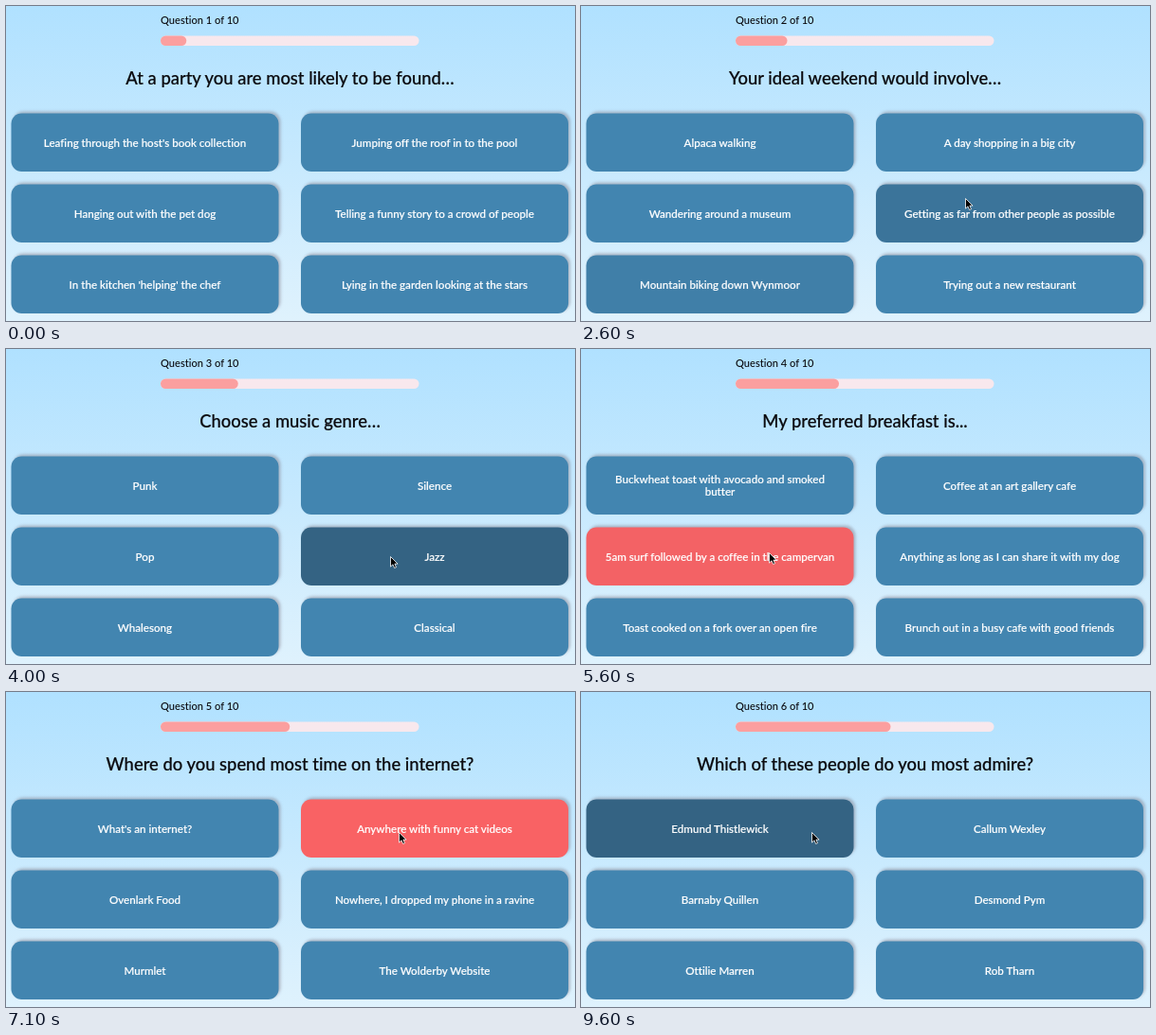
Recreate the animation shown at these times as an HTML page. Size 600 by 333 pixels, loop 9800 ms.

```html
<!DOCTYPE html>
<html lang="en">
<head>
<meta charset="utf-8">
<title>Quiz</title>
<style>
  html, body { margin: 0; width: 100%; height: 100%; overflow: hidden; background: #c5e9fe; }
  svg { display: block; width: 100vw; height: 100vh; }
  text { font: 500 11.1px Lato, "Open Sans", sans-serif; font-variant-ligatures: none; fill: #0b0b0f; }
  #title { font-size: 18.4px; text-anchor: middle; stroke: #0b0b0f; stroke-width: .2px; }
  .option text { font-size: 11.6px; fill: #fff; text-anchor: middle; stroke: #fff; stroke-width: .2px; }
  .option rect { filter: drop-shadow(2.5px -1.5px 1.5px rgba(135, 135, 150, .55)); }
</style>
</head>
<body>
<svg id="stage" viewBox="0 0 600 333">
  <defs>
    <linearGradient id="sky" x2="0" y2="1">
      <stop stop-color="#b0e1ff"/>
      <stop offset="1" stop-color="#dff2fd"/>
    </linearGradient>
  </defs>
  <rect width="600" height="333" fill="url(#sky)"/>
  <text id="count" x="163" y="19"></text>
  <rect x="163" y="31.5" width="272.5" height="10.5" rx="5.25" fill="#f8e8ed"/>
  <rect id="bar" x="163" y="31.5" height="10.5" rx="5.25" fill="#fb9f9f"/>
  <text id="title" x="299.5" y="82.5"></text>
  <g id="options"></g>
  <path id="cursor" d="M0 0V10.6L2.5 8.3L4.1 12L6 11.2L4.4 7.6H7.6Z"
        fill="#000" stroke="#fff" stroke-width=".8" stroke-linejoin="round"/>
</svg>
<script>
const LOOP = 9800, STEP = 100, FADE = 400;
const BLUE = [66, 133, 176], DARK = [52, 99, 131], RED = [253, 98, 99];

// Options run left to right, top to bottom; "|" breaks a line.
const questions = [
  { at: 0, title: "At a party you are most likely to be found…", options: [
    "Leafing through the host's book collection", "Jumping off the roof in to the pool",
    "Hanging out with the pet dog", "Telling a funny story to a crowd of people",
    "In the kitchen 'helping' the chef", "Lying in the garden looking at the stars"] },
  { at: 2000, title: "Your ideal weekend would involve…", options: [
    "Alpaca walking", "A day shopping in a big city",
    "Wandering around a museum", "Getting as far from other people as possible",
    "Mountain biking down Wynmoor", "Trying out a new restaurant"] },
  { at: 3500, title: "Choose a music genre…", options: [
    "Punk", "Silence", "Pop", "Jazz", "Whalesong", "Classical"] },
  { at: 4700, title: "My preferred breakfast is...", options: [
    "Buckwheat toast with avocado and smoked|butter", "Coffee at an art gallery cafe",
    "5am surf followed by a coffee in the campervan", "Anything as long as I can share it with my dog",
    "Toast cooked on a fork over an open fire", "Brunch out in a busy cafe with good friends"] },
  { at: 5900, title: "Where do you spend most time on the internet?", options: [
    "What's an internet?", "Anywhere with funny cat videos",
    "Ovenlark Food", "Nowhere, I dropped my phone in a ravine",
    "Murmlet", "The Wolderby Website"] },
  { at: 7500, title: "Which of these people do you most admire?", options: [
    "Edmund Thistlewick", "Callum Wexley", "Barnaby Quillen",
    "Desmond Pym", "Ottilie Marren", "Rob Tharn"] }
];

// Colour changes of each option: [time, colour]
const changes = [
  [[8700, DARK]],
  [[6500, DARK], [6750, RED], [7500, DARK], [8400, BLUE]],
  [[5000, DARK], [5280, RED], [5900, DARK], [6300, BLUE]],
  [[2470, DARK], [2900, RED], [3500, DARK], [4100, RED], [4700, DARK], [5000, BLUE]],
  [[900, DARK], [1150, RED], [2000, DARK], [2350, BLUE]],
  []
];

// Cursor moves: [start, end, x, y]
const moves = [
  [0, 0, 160, 345], [700, 1100, 149.5, 304.5], [2250, 2600, 405.5, 203.5],
  [3100, 3700, 405.5, 219.5], [4900, 5200, 198.5, 215.5], [6200, 6700, 414.5, 148.5],
  [8200, 8900, 243.5, 148.5]
];

const $ = id => document.getElementById(id);
const clamp = v => Math.max(0, Math.min(1, v));
const smooth = v => v * v * (3 - 2 * v);
const mix = (a, b, k) => a.map((v, i) => v + (b[i] - v) * k);

function add(parent, tag, attrs, text = "") {
  const node = document.createElementNS("http://www.w3.org/2000/svg", tag);
  for (const name in attrs) node.setAttribute(name, attrs[name]);
  node.textContent = text;
  return parent.appendChild(node);
}

const options = changes.map((_, i) => {
  const x = i % 2 ? 311 : 5.5, y = 113.5 + 75 * (i >> 1);
  const group = add($("options"), "g", { class: "option" });
  const rect = add(group, "rect", { x, y, width: 282, height: 61.5, rx: 11 });
  const label = add(group, "g", {});
  return { rect, label, x: x + 141, y: y + 35 };
});

function colourAt(list, time) {
  let colour = BLUE;
  list.forEach(([start, target], i) => {
    if (start > time) return;
    const end = Math.min(time, list[i + 1]?.[0] ?? LOOP);
    colour = mix(colour, target, Math.sin(clamp((end - start) / FADE) * Math.PI / 2));
  });
  return `rgb(${colour.map(Math.round)})`;
}

function cursorAt(time) {
  let pos = moves[0].slice(2);
  for (const [start, end, x, y] of moves.slice(1))
    pos = mix(pos, [x, y], smooth(clamp((time - start) / (end - start))));
  return pos;
}

let shown = -1;
function showQuestion(index) {
  if (index === shown) return;
  shown = index;
  const question = questions[index];
  $("count").textContent = `Question ${index + 1} of 10`;
  $("bar").setAttribute("width", 27.25 * (index + 1));
  $("title").textContent = question.title;
  options.forEach(({ label, x, y }, i) => {
    label.replaceChildren();
    const lines = question.options[i].split("|");
    lines.forEach((line, n) =>
      add(label, "text", { x, y: y + 13 * (n - (lines.length - 1) / 2) }, line));
  });
}

function draw(now) {
  const time = Math.floor((now % LOOP) / STEP) * STEP;
  showQuestion(questions.filter(q => q.at <= time).length - 1);
  options.forEach(({ rect }, i) => rect.setAttribute("fill", colourAt(changes[i], time)));
  $("cursor").setAttribute("transform", `translate(${cursorAt(time)})`);
}

const begin = performance.now();
function tick() {
  draw(performance.now() - begin);
  requestAnimationFrame(tick);
}
tick();
</script>
</body>
</html>
```
